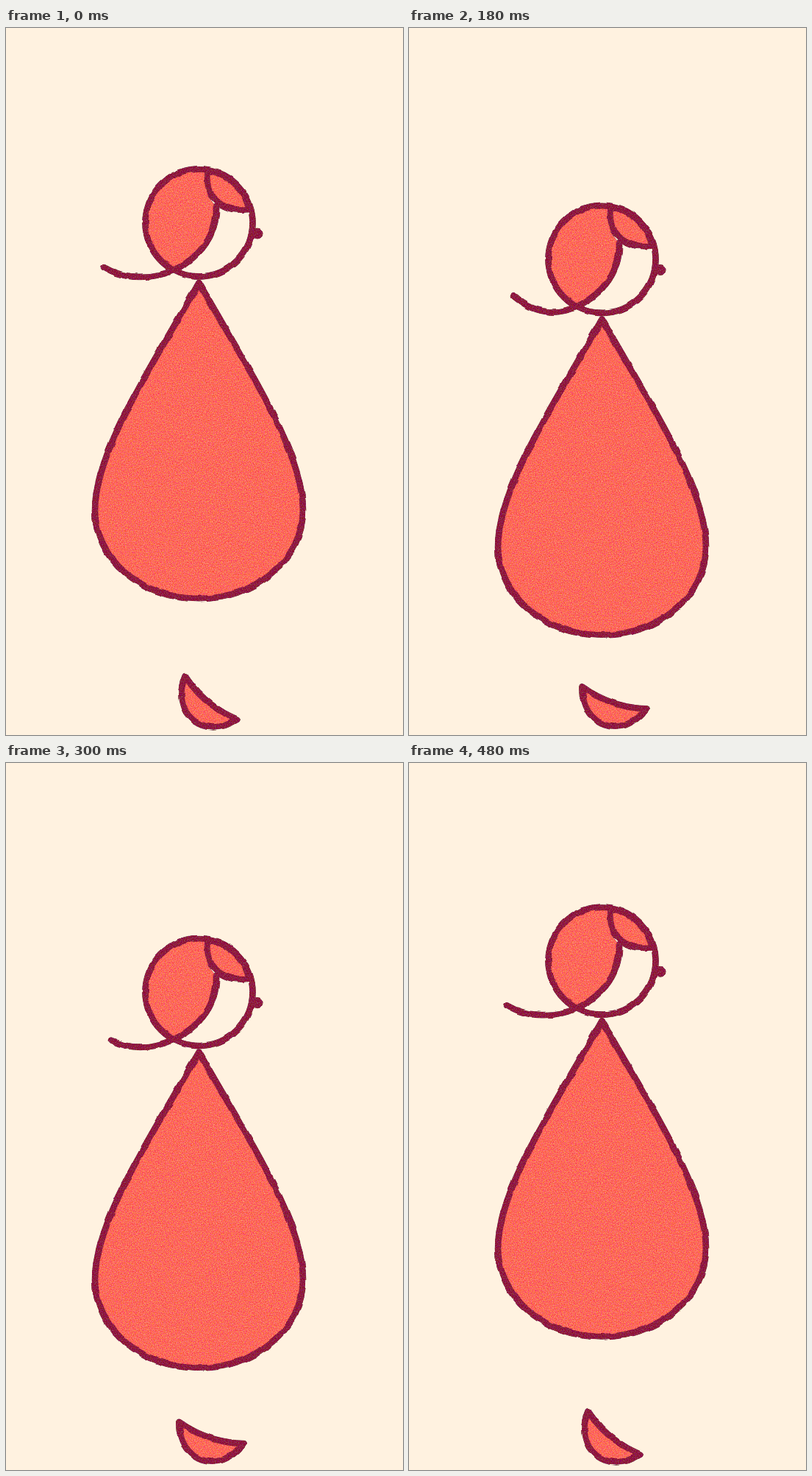
Write an HTML page that moves like this. It is 540 by 960 pixels and loops after 540 ms.

```html
<!DOCTYPE html>
<html lang="en">
<head>
<meta charset="utf-8">
<title>Bouncing figure</title>
<style>
  html, body { margin: 0; height: 100%; overflow: hidden; background: #fff2e0; }
  svg { display: block; width: 100vw; height: 100vh; }
  .ink { fill: none; stroke: #8f1a41; stroke-width: 8.8; stroke-linecap: round; stroke-linejoin: round; }
  .coral { fill: #ff695b; }
</style>
</head>
<body>
<svg viewBox="0 0 540 960">
  <defs>
    <!-- Uneven ink edges plus a fine print grain inside the painted areas -->
    <filter id="print" filterUnits="userSpaceOnUse" x="0" y="0" width="540" height="960" color-interpolation-filters="sRGB">
      <feTurbulence type="fractalNoise" baseFrequency=".07" numOctaves="1" seed="4"/>
      <feDisplacementMap in="SourceGraphic" scale="4" xChannelSelector="R" yChannelSelector="G" result="rough"/>
      <feTurbulence type="fractalNoise" baseFrequency=".8" numOctaves="2" seed="9"/>
      <feColorMatrix values=".4 0 0 0 .3  0 1 0 0 0  0 0 1 0 0  0 0 0 0 1" result="grain"/>
      <feComposite in="rough" in2="grain" operator="arithmetic" k2="1" k3=".7" k4="-.35"/>
      <feComposite in2="rough" operator="in"/>
    </filter>
  </defs>

  <g id="figure" class="ink" filter="url(#print)">
    <path class="coral" stroke="none" d="M275 192.5A73 73 0 0 0 228 329C266 310 287 280 286 243C276 235 270 212 275 193Z"/>
    <path class="coral" d="M275 193C270 226 289 251 331 246A73 73 0 0 0 275 193Z"/>
    <circle cx="262.5" cy="264.5" r="73"/>
    <path id="strand"/>
    <circle cx="342" cy="279" r="3.2" fill="#8f1a41"/>
    <path class="coral" d="M262.5 346C330 465 404 575 404 655C404 721 341 775 262.5 775S121 721 121 655C121 575 195 465 262.5 346Z"/>
  </g>

  <g class="ink" filter="url(#print)">
    <path id="foot" class="coral" d="M-46 0Q0 14 46 0C30 52-30 52-46 0Z"/>
  </g>
</svg>
<script>
  const STEP = 60, STEPS = 9, LOWEST = 4, DROP = 66;
  const strandTips = [[133, 325], [138, 322], [141, 314], [142, 314], [142, 316], [143, 330], [141, 343], [136, 336], [133, 325]];
  const footAngles = [39.7, 31.3, 25.2, 19, 12.7, 18.5, 25.7, 33, 39.5];
  const byId = id => document.getElementById(id);

  // Steady fall, then a rise that eases out
  const bodyDrop = step => step <= LOWEST
    ? DROP * step / LOWEST
    : DROP * (1 - Math.sin((step - LOWEST) / (STEPS - LOWEST) * Math.PI / 2)) + 1;

  function draw(step) {
    const [x, y] = strandTips[step];
    byId('figure').setAttribute('transform', `translate(0 ${bodyDrop(step)})`);
    byId('strand').setAttribute('d',
      `M${x} ${y}C${x + 28} ${342 + (y - 325) * 0.3} 200 341 228 329C266 310 287 280 286 243`);
    byId('foot').setAttribute('transform', `translate(279 909.5) rotate(${footAngles[step]})`);
  }

  let shown = -1;
  function tick() {
    const step = Math.floor(performance.now() / STEP) % STEPS;
    if (step !== shown) draw(shown = step);
    requestAnimationFrame(tick);
  }
  tick();
</script>
</body>
</html>
```
